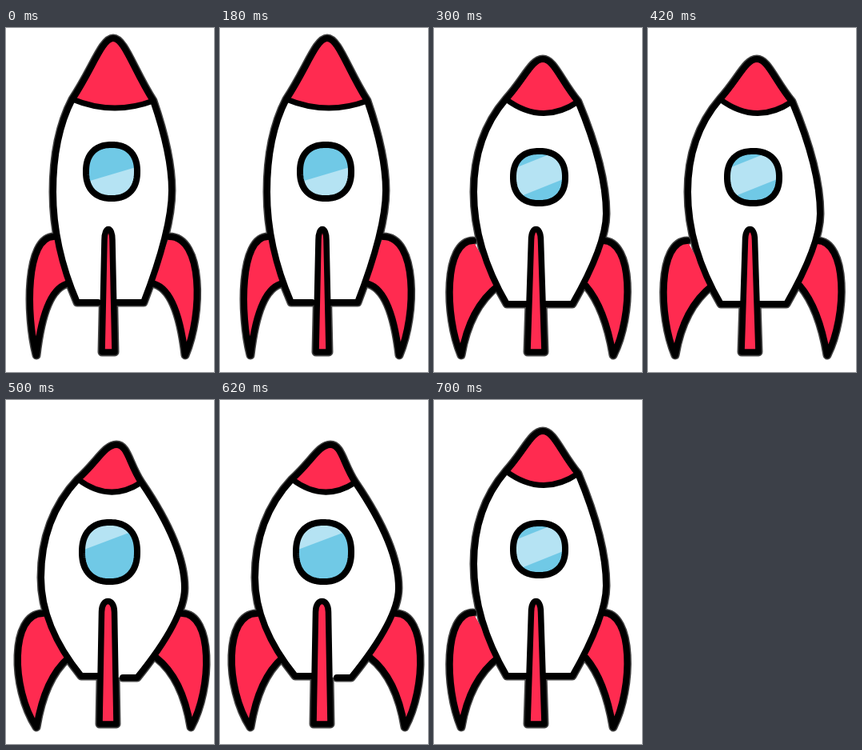
Recreate the animation shown at these times as an HTML page with a canvas. Size 260 by 430 pixels, loop 900 ms.

```html
<!DOCTYPE html>
<html lang="en">
<head>
<meta charset="utf-8">
<title>Rocket</title>
<style>
html, body { margin: 0; width: 100%; height: 100%; overflow: hidden; background: #fff; }
canvas { display: block; width: 260px; height: 430px; }
</style>
</head>
<body>
<canvas id="stage" width="260" height="430"></canvas>
<script>
const ctx = document.getElementById('stage').getContext('2d');
const RED = '#ff2b50', SKY = '#70c9e6', SHINE = '#b5e3f3', INK = '#000', RIM = '#444';

// Key points of each pose; a fin lists the x of its top, bulge, tip and root.
const tall = {
  tip: [134, 13], sag: 10, finTop: 261, finRoot: 319, flare: 5,
  left: { shoulder: [83, 89], belly: [59, 205], foot: [89, 343], fin: [60, 25, 38, 79] },
  right: { shoulder: [184, 91], belly: [207, 203], foot: [172, 343], fin: [204, 246, 224, 182] },
  port: { x: 132, y: 179.5, rx: 32, ry: 33.5, shine: 183, slope: -0.3 },
  mast: { x: 128, neck: 5, base: 8 }, gap: 138
};
const mid = {
  tip: [136, 39], sag: 16, finTop: 266, finRoot: 322, flare: 28,
  left: { shoulder: [90, 89], belly: [50, 205], foot: [91, 345], fin: [49, 13, 34, 80] },
  right: { shoulder: [180, 92], belly: [215, 232], foot: [173, 345], fin: [211, 249, 224, 190] },
  port: { x: 131.5, y: 186.5, rx: 32.5, ry: 32.5, shine: 163, slope: -0.4 },
  mast: { x: 127.5, neck: 6, base: 10.5 }, gap: 139
};
const squat = {
  tip: [138, 56], sag: 14, finTop: 267, finRoot: 322, flare: 26,
  left: { shoulder: [90, 99], belly: [44, 222], foot: [94, 345], fin: [46, 6, 38, 78] },
  right: { shoulder: [169, 103], belly: [223, 235], foot: [164, 347], fin: [220, 258, 231, 188] },
  port: { x: 129.5, y: 190, rx: 34.5, ry: 37, shine: 137, slope: -0.38 },
  mast: { x: 127.5, neck: 8, base: 10.5 }, gap: 146
};

const mix = (a, b, k) => a + (b - a) * k;

function finPath({ fin: [top, bulge, tip, root] }, pose, side) {
  const { finTop, finRoot, flare } = pose, tipY = 409;
  return new Path2D(
    `M${top} ${finTop} C${bulge} ${finTop} ${bulge} ${mix(finTop, tipY, 0.65)} ${tip} ${tipY}
     Q${tip - 10 * side} ${finRoot + flare} ${root} ${finRoot}`);
}

function mastPath({ x, neck, base }) {
  return new Path2D(
    `M${x - base} 405 L${x - neck} 265 C${x - neck} 247 ${x + neck} 247 ${x + neck} 265
     L${x + base} 405 Z`);
}

// Slightly squared ellipse
function portPath({ x, y, rx, ry }) {
  const path = new Path2D(), bend = v => Math.sign(v) * Math.abs(v) ** 0.86;
  for (let a = 0; a < 2 * Math.PI; a += 0.05) {
    path.lineTo(x + rx * bend(Math.cos(a)), y + ry * bend(Math.sin(a)));
  }
  path.closePath();
  return path;
}

function build(pose) {
  const { left: l, right: r, tip: [tx, ty], port, mast } = pose;
  const half = s => [mix(s.shoulder[0], tx, 0.5), mix(s.shoulder[1], ty, 0.5)];
  const bend = (s, from, to, k) => `${s.belly[0]} ${mix(s[from][1], s[to][1], k)}`;
  const nose = `C${half(l)} ${tx - 14} ${ty} ${tx} ${ty} C${tx + 14} ${ty} ${half(r)} ${r.shoulder}`;
  const sagX = mix(l.shoulder[0], r.shoulder[0], 0.5);
  const sagY = mix(l.shoulder[1], r.shoulder[1], 0.5) + 2 * pose.sag;
  return {
    port, glass: portPath(port), mast: mastPath(mast),
    fins: [finPath(l, pose, -1), finPath(r, pose, 1)],
    nose: new Path2D(`M${l.shoulder} ${nose} Q${sagX} ${sagY} ${l.shoulder} Z`),
    hull: new Path2D(
      `M115 ${l.foot[1]} L${l.foot}
       Q${bend(l, 'foot', 'belly', 0.5)} ${l.belly} Q${bend(l, 'belly', 'shoulder', 0.6)} ${l.shoulder}
       ${nose}
       Q${bend(r, 'shoulder', 'belly', 0.6)} ${r.belly} Q${bend(r, 'belly', 'foot', 0.35)} ${r.foot}
       L${pose.gap} ${r.foot[1]}`)
  };
}

function fill(path, color) {
  ctx.fillStyle = color;
  ctx.fill(path);
}

function line(path, width, color = INK) {
  ctx.lineWidth = width;
  ctx.strokeStyle = color;
  ctx.stroke(path);
}

function drawGlass(glass, { x, shine, slope }) {
  ctx.save();
  ctx.clip(glass);
  ctx.fillStyle = SKY;
  ctx.fillRect(0, 0, 260, 430);
  ctx.transform(1, slope, 0, 1, x, shine);
  ctx.fillStyle = SHINE;
  ctx.fillRect(-50, 0, 100, 38);
  ctx.restore();
  line(glass, 8);
}

function draw(r) {
  ctx.fillStyle = '#fff';
  ctx.fillRect(0, 0, 260, 430);
  ctx.lineCap = ctx.lineJoin = 'round';

  for (const p of [...r.fins, r.hull, r.mast]) line(p, 11, RIM);
  for (const p of r.fins) {
    fill(p, RED);
    line(p, 8);
  }
  fill(r.hull, '#fff');
  fill(r.nose, RED);
  line(r.nose, 7);
  line(r.hull, 8);
  drawGlass(r.glass, r.port);
  fill(r.mast, RED);
  line(r.mast, 7.5);
}

const [A, B, C] = [tall, mid, squat].map(build);
const poseAt = t => t < 300 ? A : t < 500 ? B : t < 700 ? C : B;

const start = performance.now();
let shown;
function tick() {
  const pose = poseAt((performance.now() - start) % 900);
  if (pose !== shown) draw(shown = pose);
  requestAnimationFrame(tick);
}
tick();
</script>
</body>
</html>
```
